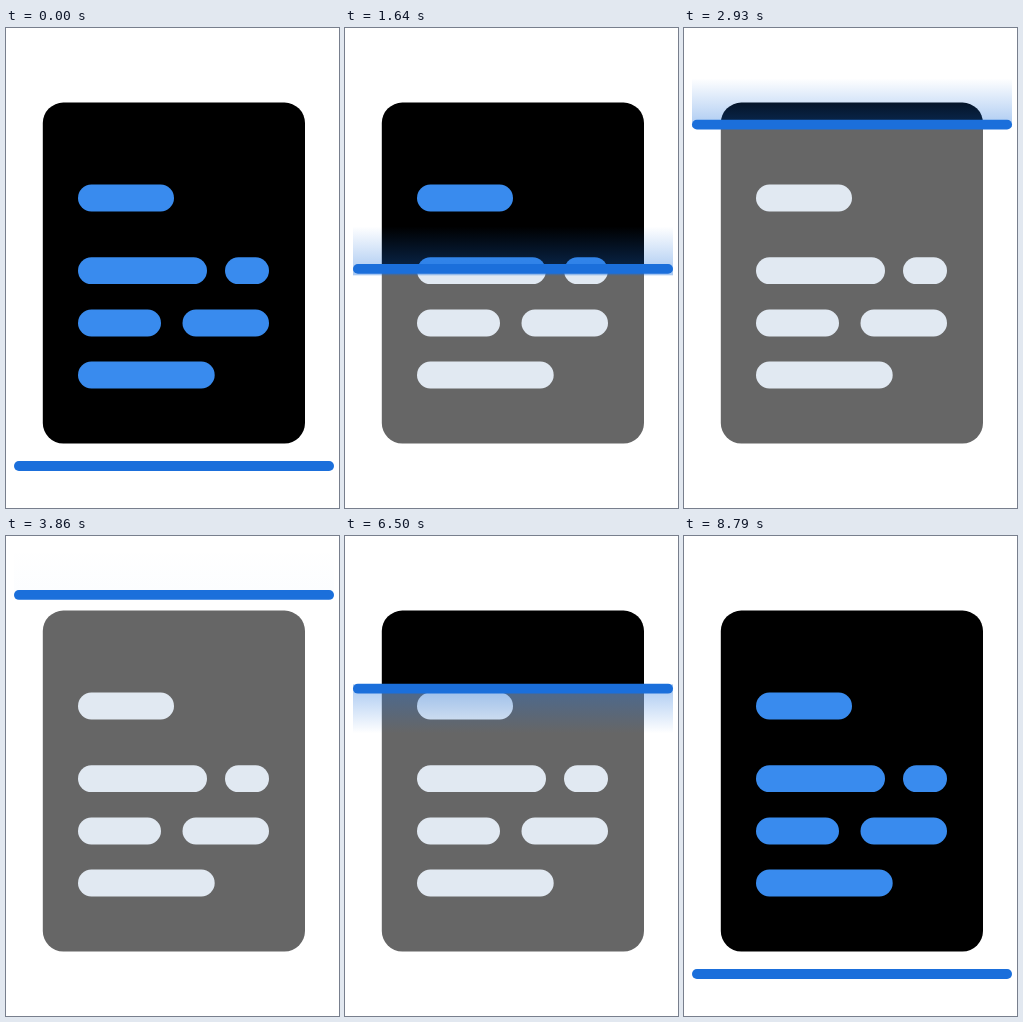
These frames come from a looping animation (333x480 px, 9570 ms). An HTML page with a canvas:

```html
<!DOCTYPE html>
<html lang="en">
<head>
<meta charset="utf-8">
<title>Document scan</title>
<style>
  html, body { margin: 0; width: 100%; height: 100%; overflow: hidden; background: #fff; }
  canvas { display: block; width: 333px; height: 480px; }
</style>
</head>
<body>
<canvas id="stage" width="333" height="480"></canvas>
<script>
const ctx = document.getElementById('stage').getContext('2d');
const LOOP = 9570, FPS = 14;
const TURN = 61.5;              // tick at which the bar reverses
const BOTTOM = 438, TOP = 54;   // bar centre at either end
const GLOW = 49, LAG = 0.55;    // glow height, and its delay in ticks
const LEFT = 8, WIDTH = 320;

const pills = [
  [72, 156.5, 96],
  [72, 229.2, 129], [219, 229.2, 44],
  [72, 281.5, 83], [176.5, 281.5, 86.5],
  [72, 333.6, 136.7]
];

const clamp = (v, lo, hi) => Math.min(hi, Math.max(lo, v));

// Cubic Bezier easing (.29, 0, .355, 1), solved by bisection
function ease(x) {
  let lo = 0, hi = 1;
  for (let i = 0; i < 30; i++) {
    const s = (lo + hi) / 2, r = 1 - s;
    if (3 * r * r * s * 0.29 + 3 * r * s * s * 0.355 + s ** 3 < x) lo = s;
    else hi = s;
  }
  return lo * lo * (3 - 2 * lo);
}

const phase = tick => clamp(tick < TURN ? tick : 2 * TURN - tick, 0, TURN);
const barY = tick => BOTTOM + (TOP - BOTTOM) * ease(phase(tick) / TURN);

function round(x, y, w, h, r, fill) {
  ctx.fillStyle = fill;
  ctx.beginPath();
  ctx.roundRect(x, y, w, h, r);
  ctx.fill();
}

function page(from, to, paper, ink) {
  ctx.save();
  ctx.beginPath();
  ctx.rect(0, from, 333, to - from);
  ctx.clip();
  round(36.8, 74.6, 262.2, 340.9, 20.5, paper);
  for (const [x, y, w] of pills) round(x, y, w, 26.9, 13.45, ink);
  ctx.restore();
}

function glow(tick) {
  const k = phase(tick);
  const strength = 0.39 * clamp(Math.min((k - 2) / 11, (54.5 - k) / 14), 0, 1);
  if (!strength) return;
  const rising = tick < TURN;
  const edge = barY(tick - LAG);
  const far = rising ? edge - GLOW : edge + GLOW;
  const shade = ctx.createLinearGradient(0, edge, 0, far);
  shade.addColorStop(0, `rgba(27,111,219,${strength})`);
  shade.addColorStop(1, 'rgba(27,111,219,0)');
  ctx.fillStyle = shade;
  ctx.fillRect(LEFT, Math.min(edge, far), WIDTH, GLOW);
}

function draw(ms) {
  const tick = Math.floor(ms * FPS / 1000 + 0.08);
  const y = barY(tick);
  ctx.fillStyle = '#fff';
  ctx.fillRect(0, 0, 333, 480);
  const split = Math.round(y);
  page(0, split, '#000', '#398bee');
  page(split, 480, '#666', '#e1e9f2');
  glow(tick);
  round(LEFT, y - 4.9, WIDTH, 9.8, 4.9, '#1b6fdb');
}

const start = performance.now();
function loop() {
  draw((performance.now() - start) % LOOP);
  requestAnimationFrame(loop);
}
loop();
</script>
</body>
</html>
```
